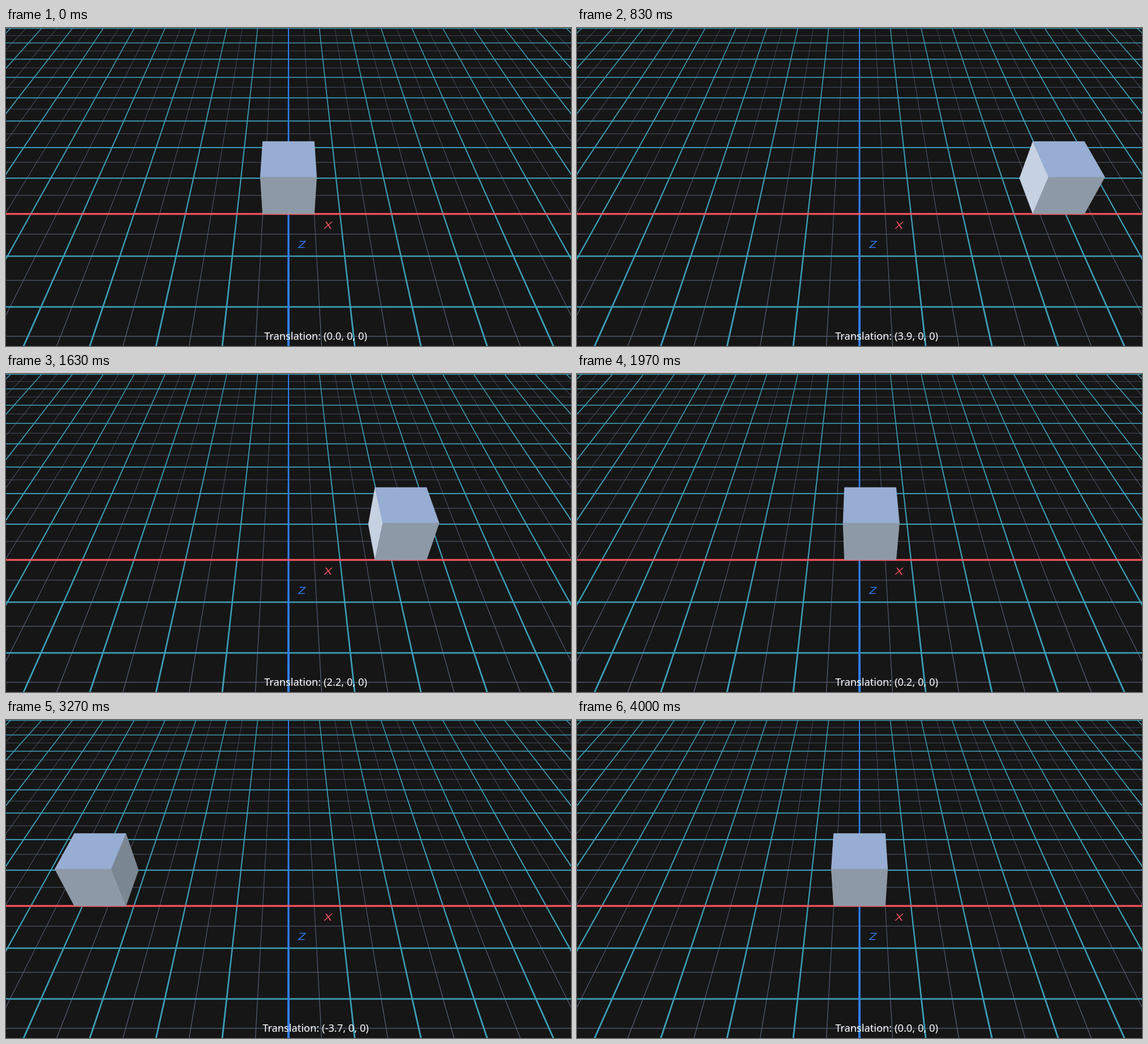
An HTML page with a canvas for the animation above (4.03 s loop, 998 px wide and 561 px high).

```html
<!DOCTYPE html>
<html lang="en">
<head>
<meta charset="utf-8">
<title>Translation along x</title>
<style>
html, body { margin: 0; height: 100%; overflow: hidden; background: #161616; }
canvas { display: block; }
</style>
</head>
<body>
<canvas id="stage" width="998" height="561"></canvas>
<script>
const ctx = document.getElementById('stage').getContext('2d');
const LOOP = 4030, LAST = 120, REACH = 4;
const TEAL = '#3c9eb7', GREY = '#59647c', RED = '#f8535d', BLUE = '#2f80f5';

// Perspective: x right, y up, z towards the viewer
const depth = (y, z) => 1 - 0.0836 * (y + z);
const project = (x, y, z) => {
  const w = depth(y, z);
  return [499 + 91 * x / w, (328 + 40.88 * z - 87 * y) / w];
};

function fill(points, color) {
  ctx.beginPath();
  for (const p of points) ctx.lineTo(...p);
  ctx.closePath();
  ctx.fillStyle = color;
  ctx.fill();
}

function rowLine(z, width, color) {
  const y = project(0, 0, z)[1], h = width / depth(0, z);
  ctx.fillStyle = color;
  ctx.fillRect(0, y - h / 2, 998, h);
}

// A floor line along z, tapering with distance
function columnLine(x, width, color) {
  const far = project(x, 0, -9), near = project(x, 0, 4);
  const lean = Math.hypot(1, (near[0] - far[0]) / (near[1] - far[1]));
  const a = width * lean / depth(0, -9) / 2, b = width * lean / depth(0, 4) / 2;
  fill([[far[0] - a, far[1]], [far[0] + a, far[1]],
        [near[0] + b, near[1]], [near[0] - b, near[1]]], color);
}

function floor() {
  for (let i = -10; i < 10; i++) {
    columnLine(i + 0.5, 0.95, GREY);
    rowLine(i + 0.5, 0.95, GREY);
  }
  for (let i = -10; i <= 10; i++) {
    if (!i) continue;
    columnLine(i, 2.3, TEAL);
    rowLine(i, 2.3, TEAL);
  }
  columnLine(0, 3.2, BLUE);
  rowLine(0, 3.2, RED);
}

function cube(x) {
  const l = x - 0.5, r = x + 0.5;
  const face = (color, ...corners) => {
    fill(corners.map(c => project(...c)), color);
    ctx.strokeStyle = color;
    ctx.lineWidth = 0.4;
    ctx.stroke();
  };
  const side = (e, color) => face(color, [e, 0, 0], [e, 1, 0], [e, 1, -1], [e, 0, -1]);
  side(l, '#c6d1e2');
  side(r, '#7b8693');
  face('#97add3', [l, 1, 0], [r, 1, 0], [r, 1, -1], [l, 1, -1]);
  face('#8e99a7', [l, 0, 0], [r, 0, 0], [r, 1, 0], [l, 1, 0]);
}

function axisLabel(text, x, y, color) {
  ctx.save();
  ctx.transform(1, 0, -0.15, 0.72, x, y);
  ctx.font = '24px "Open Sans", sans-serif';
  ctx.fillStyle = color;
  ctx.fillText(text, 0, 0);
  ctx.restore();
}

function draw(now) {
  // 30 steps per second, shown on a 10 ms clock
  const step = Math.min(LAST, Math.floor((now % LOOP) * 0.03 + 0.11));
  const x = REACH * Math.sin(2 * Math.PI * step / LAST);
  const shown = Math.round(x * 10) / 10 || 0;

  ctx.fillStyle = '#161616';
  ctx.fillRect(0, 0, 998, 561);
  floor();
  cube(x);
  ctx.textAlign = 'center';
  axisLabel('X', 568, 354, RED);
  axisLabel('Z', 521.5, 388, BLUE);
  ctx.font = '18.25px "Noto Sans", sans-serif';
  ctx.fillStyle = '#fff';
  ctx.fillText(`Translation: (${shown.toFixed(1)}, 0, 0)`, 547, 550);
}

const start = performance.now();
function tick() {
  draw(performance.now() - start);
  requestAnimationFrame(tick);
}
tick();
</script>
</body>
</html>
```
